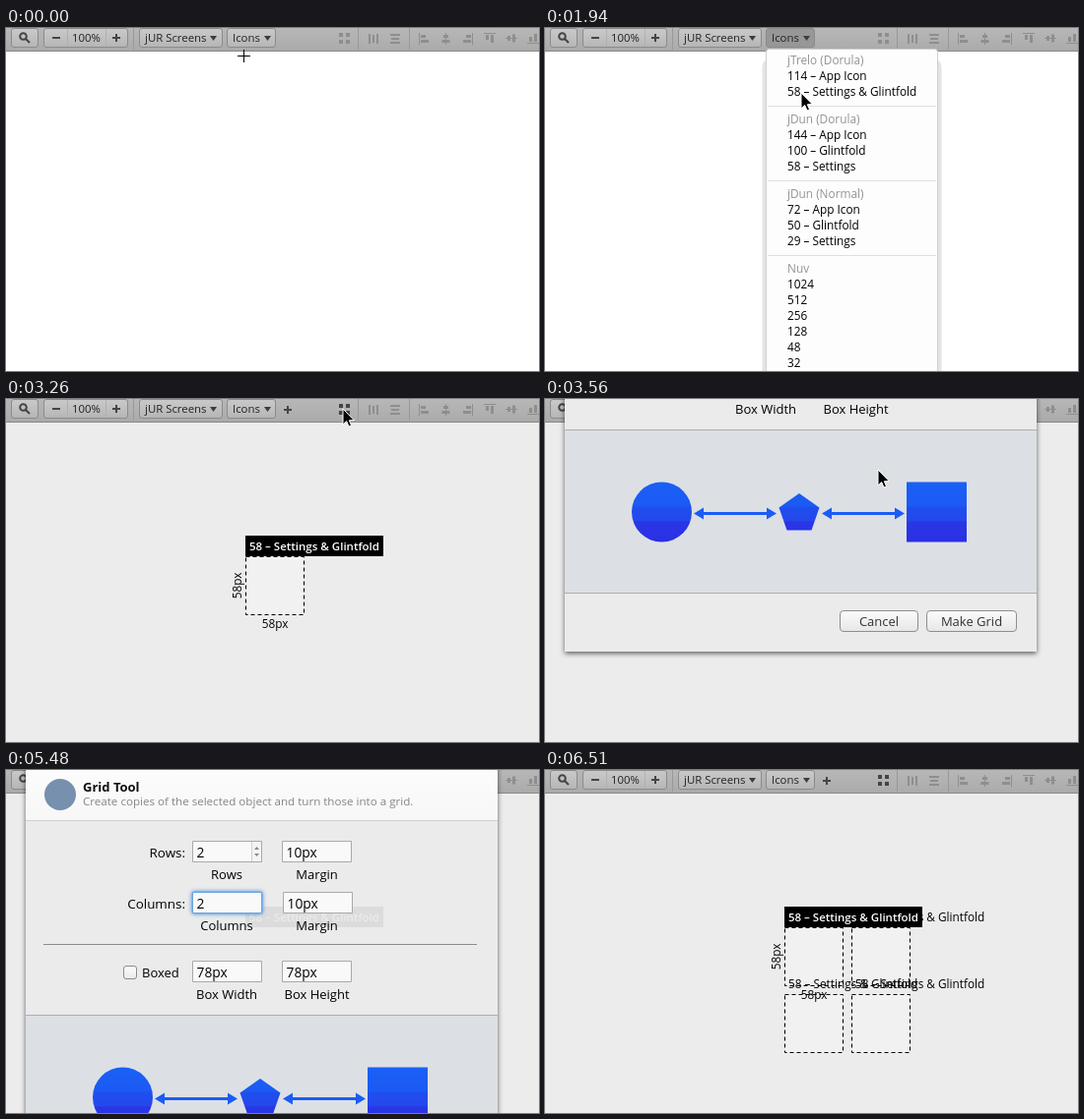
These frames come from a looping animation (541x349 px, 6.96 s). An HTML page with a canvas:

```html
<!DOCTYPE html>
<html>
<head>
<meta charset="utf-8">
<style>
html, body { margin: 0; height: 100%; overflow: hidden; background: #fff; }
canvas { display: block; }
</style>
</head>
<body>
<canvas width="541" height="349"></canvas>
<script>
const W = 541, H = 349, LOOP = 6960;
const c = document.querySelector('canvas').getContext('2d');

const TICKS = [0, 450, 750, 900, 1050, 1500, 1640, 1940, 2080, 2220, 2370,
  2820, 2970, 3120, 3260, 3410, 3560, 3710, 3860, 4000, 4150, 4300, 4450,
  4600, 4740, 4890, 5040, 5480, 5630, 5780, 5920, 6070, 6370, 6510];

const POINTER = [
  [0, 'cross', 241, 28], [450, 'arrow', 245, 21], [900, 'arrow', 250, 36],
  [1050, 'arrow', 257, 47], [1500, 'arrow', 259, 56], [1640, 'arrow', 260, 66],
  [2370, 'cross', 263, 70], [2820, 'cross', 290, 50], [2970, 'arrow', 324, 22],
  [3120, 'arrow', 342, 10], [3410, 'arrow', 341, 32], [3560, 'arrow', 338, 72],
  [4000, 'arrow', 315, 95], [4150, 'arrow', 278, 118], [4300, 'beam', 246, 140],
  [4450, 'beam', 212, 136], [4740, 'none', 0, 0]
];

const NAME = '58 – Settings & Glintfold';
const MENU = [
  ['jTrelo (Dorula)', '114 – App Icon', NAME],
  ['jDun (Dorula)', '144 – App Icon', '100 – Glintfold', '58 – Settings'],
  ['jDun (Normal)', '72 – App Icon', '50 – Glintfold', '29 – Settings'],
  ['Nuv', '1024', '512', '256', '128', '48', '32']
];

const smooth = p => { p = Math.min(1, Math.max(0, p)); return p * p * (3 - 2 * p); };

function rect(x, y, w, h, fill) {
  c.fillStyle = fill;
  c.fillRect(x, y, w, h);
}

function text(s, x, y, size = 11.8, fill = '#000', align = 'left', weight = 500) {
  c.font = `${weight} ${size}px "Open Sans", "Noto Sans", sans-serif`;
  c.textAlign = align;
  c.fillStyle = fill;
  c.fillText(s, x, y);
}

function shade(y0, y1, ...colors) {
  const g = c.createLinearGradient(0, y0, 0, y1);
  colors.forEach((col, i) => g.addColorStop(i / (colors.length - 1), col));
  return g;
}

function box(x, y, w, h, r, fill, stroke) {
  c.beginPath();
  c.roundRect(x + .5, y + .5, w - 1, h - 1, r);
  c.fillStyle = fill;
  c.fill();
  if (stroke) {
    c.strokeStyle = stroke;
    c.lineWidth = 1;
    c.stroke();
  }
}

function poly(points, fill) {
  c.beginPath();
  points.forEach(p => c.lineTo(...p));
  c.closePath();
  c.fillStyle = fill;
  c.fill();
}

function toolButton(x, w, pressed) {
  box(x, 0, w, 20, 2.5, pressed ? '#979797' : shade(0, 20, '#cacaca', '#b5b5b5'), '#8b8b8b');
}

const dropArrow = x => poly([[x, 8], [x + 7, 8], [x + 3.5, 13]], '#3c3c3c');

function plus(x, y, r, fill) {
  rect(x - r, y - 1, 2 * r, 2, fill);
  rect(x - 1, y - r, 2, 2 * r, fill);
}

// A guide line with two bars; kind 0 start, 1 centre, 2 end
function alignIcon(x, kind, vertical) {
  c.save();
  c.translate(x, 11);
  if (vertical) c.transform(0, 1, 1, 0, 0, 0);
  rect([-6, -1, 4][kind], -6, 1, 12, '#8e8e8e');
  [[-4, 5], [1, 8]].forEach(([y, len]) =>
    rect([-4, -len / 2 - .5, 3 - len][kind], y, len, 3, '#8e8e8e'));
  c.restore();
}

function toolbar(t) {
  rect(0, 0, W, 24, shade(0, 24, '#b7b7b7', '#aaa'));
  rect(0, 23, W, 1, '#888');
  toolButton(5, 28);
  c.strokeStyle = '#444';
  c.lineWidth = 2;
  c.beginPath();
  c.arc(17.5, 8.5, 3.3, 0, 7);
  c.moveTo(20, 11);
  c.lineTo(24, 15);
  c.stroke();

  toolButton(38, 86);
  rect(62, 1, 1, 18, '#b0b0b0');
  rect(101, 1, 1, 18, '#b0b0b0');
  rect(47, 9, 8, 2, '#444');
  plus(112, 10, 4, '#444');
  text('100%', 81.5, 14, 11.4, '#222', 'center');
  toolButton(135, 85);
  text('jUR Screens', 141, 14, 11.4, '#222');
  dropArrow(207);
  toolButton(224, 50, t >= 750 && t < 2220);
  text('Icons', 230, 14, 11.4, '#222');
  dropArrow(262);

  const made = t >= 2220;
  if (made) plus(286, 11, 4, '#444');
  for (const x of [338, 345])
    for (const y of [5, 12]) rect(x, y, 4, 4, made ? '#444' : '#8e8e8e');
  for (const x of [129, 357, 409]) rect(x, 0, 1, 22, '#999');
  [0, 4, 8].forEach((d, i) => {
    const inset = i === 1 ? 1 : 0;
    rect(368 + d, 6 + inset, 2, 10 - 2 * inset, '#8e8e8e');
    rect(390 + inset, 6 + d, 10 - 2 * inset, 2, '#8e8e8e');
  });
  for (let i = 0; i < 6; i++) alignIcon(425 + 22 * i, i % 3, i > 2);
}

function menu(t) {
  c.globalAlpha = t === 750 ? .6 : t === 2220 ? .35 : 1;
  box(220, 31, 183, 340, 8, '#e4e4e4');
  box(224, 21, 175, 340, 3, '#fdfdfd', '#cfcfcf');
  const hot = t === 1050 || t === 1500 ? '114 – App Icon'
    : t === 1640 || t === 2080 ? NAME : '';
  let y = 37;
  MENU.forEach((group, g) => {
    if (g) {
      rect(226, y - 6, 171, 1, '#e0e0e0');
      y += 12;
    }
    group.forEach((item, i) => {
      if (item === hot) rect(225, y - 12, 173, 16, shade(y - 12, y + 4, '#5480f2', '#1d51e6'));
      text(item, 246, y, 11.8, item === hot ? '#fff' : i ? '#000' : '#949494');
      y += 16;
    });
  });
  c.globalAlpha = 1;
}

function artboard(x, y) {
  rect(x, y, 60, 60, '#f1f1f1');
  c.strokeStyle = '#000';
  c.lineWidth = 1;
  c.setLineDash([4, 3]);
  c.strokeRect(x + .5, y + .5, 59, 59);
  c.setLineDash([]);
}

function artboards(t) {
  const grid = t >= 5630;
  for (const y of grid ? [160, 228] : [160])
    for (const x of grid ? [243, 311] : [243]) {
      artboard(x, y);
      if (grid) text(NAME, x + 4, y - 6);
    }
  if (grid && t < 6370) return;
  rect(243, 139, 140, 21, '#000');
  text(NAME, 247, 154, 11.5, '#fff', 'left', 600);
  text('58px', 273, 233, 11.8, '#000', 'center');
  c.save();
  c.translate(239, 190);
  c.rotate(-Math.PI / 2);
  text('58px', 0, 0, 11.8, '#000', 'center');
  c.restore();
}

function field(x, y, value, { focus, caret, selected, stepper } = {}) {
  if (focus) {
    c.shadowColor = '#4a90dc';
    c.shadowBlur = 4;
    box(x - 1, y - 1, 73, 24, 2, '#7db0e4');
    c.shadowColor = 'transparent';
  }
  box(x, y, 71, 22, 0, '#f9f9f9', focus ? '#6ea4dc' : '#a9a9a9');
  if (selected) rect(x + 4, y + 3, 9, 16, '#b4d5fe');
  text(value, x + 4.5, y + 17, 13.8);
  if (caret) rect(x + 13, y + 4, 1, 15, '#000');
  if (stepper) {
    rect(x + 60, y + 1, 10, 20, '#f4f4f4');
    rect(x + 60, y + 1, 1, 20, '#d0d0d0');
    poly([[x + 63, y + 9], [x + 68, y + 9], [x + 65.5, y + 6]], '#888');
    poly([[x + 63, y + 13], [x + 68, y + 13], [x + 65.5, y + 16]], '#888');
  }
}

function doubleArrow(x0, x1, y, fill) {
  rect(x0 + 8, y - 1.5, x1 - x0 - 16, 3, fill);
  poly([[x0, y], [x0 + 10, y - 6], [x0 + 10, y + 6]], fill);
  poly([[x1, y], [x1 - 10, y - 6], [x1 - 10, y + 6]], fill);
}

function preview() {
  rect(20, 249, 479, 167, '#dce0e5');
  rect(20, 249, 479, 1, '#adadad');
  rect(20, 415, 479, 1, '#adadad');
  const blue = c.createLinearGradient(0, 302, 0, 364);
  [[0, '#1a60f6'], [.4, '#1c5af3'], [.42, '#204eee'], [.64, '#2448eb'], [.66, '#2a36e6'], [1, '#2a30e4']]
    .forEach(stop => blue.addColorStop(...stop));
  c.beginPath();
  c.arc(118.5, 333, 30.5, 0, 7);
  c.fillStyle = blue;
  c.fill();
  poly([[258, 314], [278.5, 328.5], [270.5, 351.5], [245.5, 351.5], [237.5, 328.5]], blue);
  rect(367, 302.5, 61, 61, blue);
  doubleArrow(151, 235, 334.5, '#1a5cf5');
  doubleArrow(281, 365, 334.5, '#1a5cf5');
}

function sheet(t) {
  const y = Math.round(-475 * (1 - smooth((t - 3249) / 590) + smooth((t - 5480) / 590)));
  c.save();
  c.translate(0, y);
  c.shadowColor = 'rgba(0,0,0,.6)';
  c.shadowBlur = 5;
  c.shadowOffsetY = 2;
  rect(20, -20, 479, 495, '#ebebeb');
  c.shadowColor = 'transparent';
  c.shadowOffsetY = 0;
  rect(20, 0, 479, 51, shade(0, 51, '#fcfcfc', '#f7f7f7'));
  rect(20, 51, 479, 1, '#d0d0d0');

  c.beginPath();
  c.arc(55, 25, 16, 0, 7);
  c.fillStyle = '#7690ad';
  c.fill();
  text('Grid Tool', 78, 22, 13, '#111', 'left', 700);
  text('Create copies of the selected object and turn those into a grid.', 78, 36, 11.6, '#858585', 'left', 400);

  // Faint label of the artboard below
  if (t >= 3860 && t < 5630) {
    rect(243, 139, 140, 21, '#dcdcdc');
    text(NAME, 247, 154, 11.5, '#ebebeb', 'left', 600);
  }

  const onColumns = t >= 4600;
  text('Rows:', 182, 89, 13.4, '#000', 'right');
  field(189, 72, t < 4000 ? '5' : '2', {
    focus: !onColumns, caret: t >= 4000 && !onColumns, selected: t < 4000, stepper: onColumns
  });
  field(280, 72, '10px');
  text('Columns:', 182, 141, 13.4, '#000', 'right');
  field(189, 124, t < 4890 ? '5' : '2', {
    focus: onColumns, caret: t >= 4890 && t < 5480, selected: onColumns && t < 4890, stepper: !onColumns
  });
  field(281, 124, '10px');
  rect(38, 177, 440, 1, '#8c8c8c');
  box(119, 199, 14, 14, 2.5, shade(199, 213, '#fdfdfd', '#e9e9e9'), '#8c8c8c');
  text('Boxed', 138, 211, 13);
  field(189, 194, '78px');
  field(280, 194, '78px');
  [['Rows', 'Margin', 111], ['Columns', 'Margin', 163], ['Box Width', 'Box Height', 233]]
    .forEach(([left, right, base]) => {
      text(left, 224, base, 13, '#000', 'center');
      text(right, 315.5, base, 13, '#000', 'center');
    });

  preview();
  [['Cancel', 299, 80], ['Make Grid', 387, 92]].forEach(([label, x, w]) => {
    box(x, 433, w, 22, 3.5, shade(433, 455, '#fcfcfc', '#e6e6e6'), '#8e8e8e');
    text(label, x + w / 2, 449, 13, '#333', 'center');
  });
  c.restore();
}

function pointer(t) {
  const [, kind, x, y] = POINTER.findLast(p => p[0] <= t);
  if (kind === 'cross') {
    rect(x - 6, y, 13, 1, '#000');
    rect(x, y - 6, 1, 13, '#000');
  } else if (kind === 'beam') {
    rect(x, y - 6, 1, 12, '#000');
    for (const end of [y - 7, y + 6]) {
      rect(x - 2, end, 2, 1, '#000');
      rect(x + 1, end, 2, 1, '#000');
    }
    rect(x - 1, y + 1, 3, 1, '#000');
  } else if (kind === 'arrow') {
    poly([[0, 0], [0, 16], [3.7, 12.6], [6, 18], [8.6, 17], [6.3, 11.8], [11.3, 11.6]]
      .map(([dx, dy]) => [x + dx, y + dy]), '#000');
    c.strokeStyle = '#fff';
    c.lineWidth = 1;
    c.stroke();
  }
}

function draw(now) {
  const t = TICKS.findLast(tick => tick <= now % LOOP);
  rect(0, 0, W, H, t < 2220 ? '#fff' : '#ececec');
  if (t >= 2220) artboards(t);
  toolbar(t);
  if (t >= 750 && t < 2370) menu(t);
  if (t > 3260 && t < 6070) sheet(t);
  pointer(t);
}

const start = performance.now();
function loop() {
  draw(performance.now() - start);
  requestAnimationFrame(loop);
}
loop();
</script>
</body>
</html>
```
